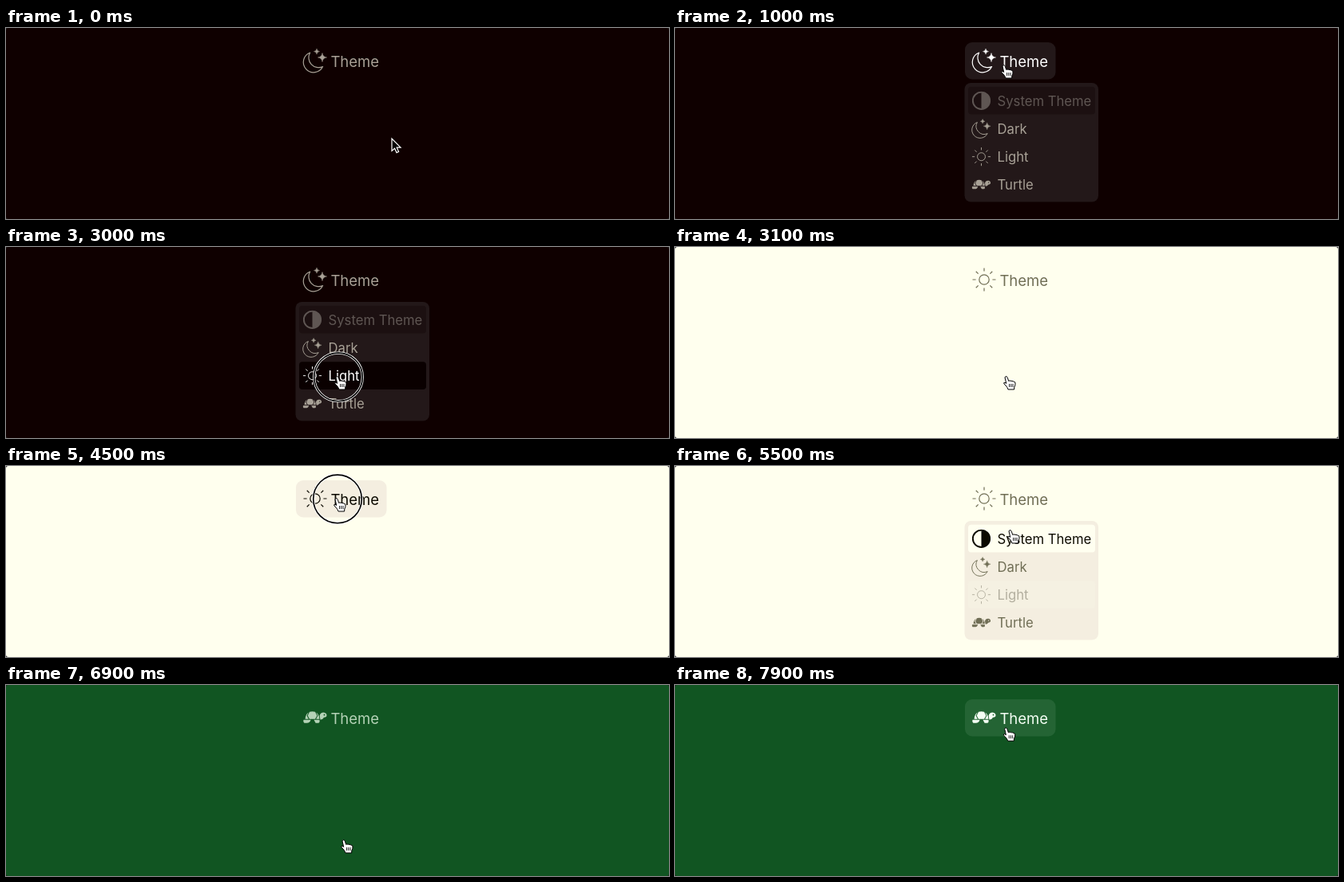
Recreate the animation shown at these times as an HTML page. Size 830x240 px, loop 8000 ms.

```html
<!DOCTYPE html>
<html lang="en">
<meta charset="utf-8">
<title>Theme menu</title>
<style>
  html, body { margin: 0; width: 100%; height: 100%; overflow: hidden; background: #222; }
  svg { display: block; }
  #stage { width: 100vw; height: 100vh; font-family: Inter, "Liberation Sans", sans-serif; }
  #stage.dark { --bg: #0f0000; --panel: #231819; --ink: #a8a196; --hot: #fff; --dim: #5f5653; --row: #0a0000; --rowOff: #1c1011; }
  #stage.light { --bg: #ffffee; --panel: #f4eee0; --ink: #706e55; --hot: #0c0a00; --dim: #b3af9f; --row: #fffff0; --rowOff: #f5f1e2; }
  #stage.turtle { --bg: #115522; --panel: #246434; --ink: #b4d2b6; --hot: #f4fff4; --dim: #6f9a77; --row: #115522; --rowOff: #1c5d2c; }
  .bg { fill: var(--bg); }
  .panel { fill: var(--panel); }
  .item { color: var(--ink); }
  .item text { fill: currentColor; font-size: 16.65px; }
  #button text { font-size: 18.5px; }
  .item rect { fill: none; }
  .item.off { color: var(--dim); }
  .item.off rect { fill: var(--rowOff); }
  .item.hot { color: var(--hot); }
  .item.hot rect { fill: var(--row); }
  #button.hot rect { fill: var(--panel); }
  .line { fill: none; stroke: currentColor; stroke-width: 1.2; }
  .solid { fill: currentColor; fill-rule: evenodd; }
</style>
<body>
<svg id="stage" viewBox="0 0 830 240">
  <symbol id="system" viewBox="0 0 30 30">
    <circle class="line" cx="15" cy="15" r="13.3" style="stroke-width:2.4"/>
    <path class="solid" d="M15 2A13 13 0 0 1 15 28Z"/>
  </symbol>
  <symbol id="dark" viewBox="0 0 30 30" overflow="visible">
    <path class="line" stroke-linejoin="round" d="M8.6 5A12.8 12.8 0 1 0 24.6 22.6A12.5 12.5 0 0 1 8.6 5Z"/>
    <path class="solid" d="M24 5.5Q24.6 10.4 29.5 11Q24.6 11.6 24 16.5Q23.4 11.6 18.5 11Q23.4 10.4 24 5.5ZM17 0Q17.4 3.1 20.5 3.5Q17.4 3.9 17 7Q16.6 3.9 13.5 3.5Q16.6 3.1 17 0Z"
      stroke="currentColor" stroke-width=".5"/>
  </symbol>
  <symbol id="light" viewBox="0 0 30 30">
    <circle class="line" cx="15" cy="15" r="6.2"/>
    <path id="rays" class="line"/>
  </symbol>
  <symbol id="turtle" viewBox="0 0 30 30">
    <path class="solid" d="M6.6 8.6L4.6 12.6L6.8 16.8H2.6Q2.8 11.4 6.6 8.6ZM8 7.8Q11.5 6.6 15 7.8L17.4 12.6L15 16.8H8L5.7 12.6Z
      M16.4 8.6Q20.2 11.4 20.4 16.8H16.2L18.4 12.6Z
      M.6 17.8H9.6Q8.4 21.8 4.6 21.8H1.4Q-.4 20 .6 17.8ZM13.4 17.8H20.4Q21.4 21.8 18 21.8H15.6Q14.6 19.6 13.4 17.8Z
      M20.6 12.6Q21.6 8.5 25.6 8.5Q29.5 9 29.5 12Q29.5 14.6 26 14.8Q24.5 17.8 21.5 17.4ZM25.6 11.5a.9 .9 0 1 0 1.8 0a.9 .9 0 1 0 -1.8 0Z"/>
  </symbol>

  <rect class="bg" width="830" height="240" rx="3"/>
  <g id="button" class="item">
    <rect x="363" y="18" width="113.5" height="46.5" rx="9"/>
    <use id="buttonIcon" x="372" y="26" width="30" height="30"/>
    <text x="406.4" y="49">Theme</text>
  </g>
  <g id="menu"><rect class="panel" x="362.5" y="69" width="167.5" height="149.5" rx="8"/></g>
  <g id="ring" fill="none">
    <circle r="30.3" stroke="#fff" stroke-width="3.2"/>
    <circle r="30.3" stroke="#000" stroke-width="1.6"/>
  </g>
  <path id="arrow" fill="#000" stroke="#fff" stroke-width="1.2" d="M0 0V15.5L3.6 12.3L6 17.6L8.6 16.5L6.2 11.2H11Z"/>
  <g id="hand" stroke="#000" stroke-linejoin="round">
    <path fill="#fff" d="M-2 1Q-1.5 -.7 0 -.3Q1 0 1.5 1.8L2.7 5.5Q3.5 4.5 5 5.3Q5.8 4.7 7 5.7Q8 5 9.2 6.3Q10.8 6 11 8Q11.2 11 9.8 13L9.6 16H2Q1 13 -1 11Q-3.8 8.8 -3.3 7.7Q-2.3 6.7 -.3 8.4Z"/>
    <path fill="none" stroke-width=".9" d="M3.6 9V13M5.8 9V13M8 9V13"/>
  </g>
</svg>
<script>
const $ = id => document.getElementById(id);
const LOOP = 8000, STEP = 100, ROW_TOP = 73.8, ROW_H = 35.2;
const names = ["system", "dark", "light", "turtle"];
const labels = ["System Theme", "Dark", "Light", "Turtle"];

// pointer positions: time, x, y
const path = [
  [0, 483, 139], [900, 412, 47], [1500, 412, 47], [2000, 414, 117], [2600, 415, 163],
  [3600, 415, 163], [4500, 414, 41], [5200, 414, 41], [5500, 420, 81], [6100, 423, 166],
  [6400, 423, 195], [7400, 423, 195], [8000, 414, 43]
];
const clicks = [900, 3000, 4500, 6800];

$("rays").setAttribute("d", [...Array(8)].map((_, i) => {
  const c = Math.cos(i * Math.PI / 4), s = Math.sin(i * Math.PI / 4);
  return `M${15 + 10.4 * c} ${15 + 10.4 * s}L${15 + 14.5 * c} ${15 + 14.5 * s}`;
}).join(""));

$("menu").innerHTML += names.map((name, i) => {
  const y = ROW_TOP + i * ROW_H;
  return `<g class="item"><rect x="367" y="${y}" width="159" height="${ROW_H - .4}" rx="4"/>
    <use href="#${name}" x="371.5" y="${y + 5.5}" width="24" height="24"/>
    <text x="403.6" y="${y + 23.9}">${labels[i]}</text></g>`;
}).join("");
const rows = [...$("menu").querySelectorAll(".item")];

function slope(i, k) {
  const a = path[i], b = path[i + 1];
  return a && b ? (b[k] - a[k]) / (b[0] - a[0]) : 0;
}

// zero at rests, harmonic mean of the neighbouring slopes elsewhere
function tangent(i, k) {
  const a = slope(i - 1, k), b = slope(i, k);
  return a * b > 0 ? 2 * a * b / (a + b) : 0;
}

function along(t, k) {
  const i = path.findIndex((p, n) => t < path[n + 1][0]);
  const a = path[i], b = path[i + 1], d = b[0] - a[0], u = (t - a[0]) / d, v = 1 - u;
  return a[k] * v * v * (1 + 2 * u) + b[k] * u * u * (1 + 2 * v)
    + d * u * v * (tangent(i, k) * v - tangent(i + 1, k) * u);
}

const show = (el, on) => el.setAttribute("visibility", on ? "visible" : "hidden");
const within = (t, a, b) => t >= a && t < b;

function draw(t) {
  const x = along(t, 1), y = along(t, 2);
  const theme = t < 3100 ? "dark" : t < 6900 ? "light" : "turtle";
  const chosen = t < 3100 ? 0 : t < 6900 ? 2 : 3;
  const open = within(t, 1000, 3100) || within(t, 4600, 6900);
  const row = open ? Math.floor((y - ROW_TOP) / ROW_H) : -1;
  const onButton = x > 363 && x < 476 && y > 18 && y < 64.5;
  // the hand stays until the pointer moves again
  const resting = within(t, 3100, 3700) || within(t, 6900, 7500);
  const hand = onButton || row >= 0 || resting;

  $("stage").setAttribute("class", theme);
  $("buttonIcon").setAttribute("href", "#" + theme);
  $("button").classList.toggle("hot", onButton);
  show($("menu"), open);
  rows.forEach((el, i) => {
    el.classList.toggle("off", i === chosen);
    el.classList.toggle("hot", i === row && i !== chosen);
  });
  show($("ring"), clicks.some(c => within(t, c, c + 100)));
  show($("hand"), hand);
  show($("arrow"), !hand);
  $("ring").setAttribute("transform", `translate(${x + 1} ${y + .4})`);
  for (const id of ["hand", "arrow"]) $(id).setAttribute("transform", `translate(${x} ${y})`);
}

const start = performance.now();
function tick() {
  const t = (performance.now() - start) % LOOP;
  draw(Math.floor(t / STEP) * STEP);
  requestAnimationFrame(tick);
}
tick();
</script>
</body>
</html>
```
